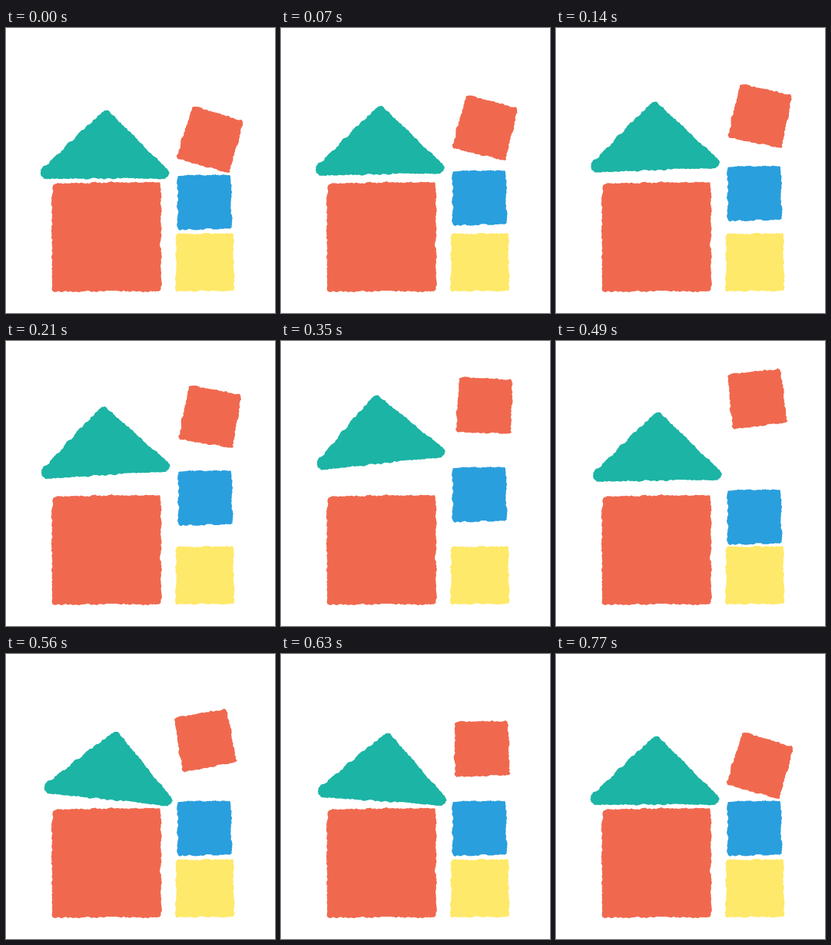
These frames come from a looping animation (350 by 370 pixels, 1.19 s). An HTML page with a canvas:

```html
<!DOCTYPE html>
<html lang="en">
<head>
<meta charset="utf-8">
<title>Bouncing blocks</title>
<style>
html, body { margin: 0; height: 100%; overflow: hidden; background: #fff; }
canvas { display: block; }
</style>
</head>
<body>
<canvas id="stage" width="350" height="370"></canvas>
<script>
const ctx = document.getElementById('stage').getContext('2d');
const STEP = 70, LOOP = 1190;

function seeded(seed) {
  return () => {
    seed = (seed * 1664525 + 1013904223) >>> 0;
    return seed / 4294967296;
  };
}

const toward = (a, b, d) => {
  const k = d / Math.hypot(b[0] - a[0], b[1] - a[1]);
  return [a[0] + (b[0] - a[0]) * k, a[1] + (b[1] - a[1]) * k];
};

// Polygon with rounded corners and a torn, crayon-like edge
function roughShape(corners, radius, seed) {
  const random = seeded(seed), points = [], n = corners.length;
  corners.forEach((p, i) => {
    const prev = corners[(i + n - 1) % n], next = corners[(i + 1) % n];
    const start = toward(p, prev, radius), end = toward(p, next, radius);
    for (let t = 0; t < 1; t += 0.25) {
      const u = 1 - t;
      points.push([0, 1].map(k => u * u * start[k] + 2 * u * t * p[k] + t * t * end[k]));
    }
    const length = Math.hypot(next[0] - p[0], next[1] - p[1]) - 2 * radius;
    for (let d = 0; d < length; d += 1.8) points.push(toward(end, next, d));
  });

  const path = new Path2D();
  let drift = 0;
  points.forEach((p, i) => {
    const a = points[(i + points.length - 1) % points.length];
    const b = points[(i + 1) % points.length];
    const size = Math.hypot(b[0] - a[0], b[1] - a[1]) || 1;
    drift = drift * 0.6 + (random() - 0.5) * 1.7;
    path.lineTo(p[0] + (b[1] - a[1]) / size * drift, p[1] - (b[0] - a[0]) / size * drift);
  });
  path.closePath();
  return path;
}

// Each key: step, x, y, degrees
const blocks = [
  {
    color: '#f0694f',
    path: roughShape([[60, 201.5], [201.5, 199.5], [202, 342], [60, 342]], 6, 11),
    keys: [[0, 0, 0, 0]]
  },
  {
    color: '#ffe96a',
    path: roughShape([[221, 267], [296.5, 266.5], [296.5, 341.5], [221, 341.5]], 3.5, 23),
    keys: [[0, 0, 0, 0]]
  },
  {
    color: '#2a9fde',
    path: roughShape([[-35, -35.5], [35, -35], [35.5, 35], [-35, 35.5]], 4.5, 37),
    keys: [[0, 258, 226, 0], [2, 258, 214.5, 0], [3, 259, 203.5, 0], [4, 258.5, 198, 0],
           [5, 258, 199, 0], [6, 258, 230.5, 0], [8, 258, 226, 0]]
  },
  {
    color: '#1cb4a5',
    path: roughShape([[2, -84], [84.5, -2], [81, 7.5], [-81, 7.5], [-85, -2]], 5, 53),
    keys: [[0, 128.5, 188, 0], [2, 129, 177, -2], [3, 129.5, 166.5, -3.4], [5, 130, 151.5, -6],
           [6, 130.5, 166, -7.5], [8, 133, 181.5, 6], [11, 128.5, 188, 0]]
  },
  {
    color: '#f0694f',
    path: roughShape([[-34.8, -35.5], [34.8, -35.5], [35.8, 35.5], [-35.8, 35.5]], 4, 71),
    keys: [[0, 266, 145, 16.5], [2, 266, 114.5, 12.2], [3, 266, 98.5, 10.3], [5, 265, 84, 2.5],
           [6, 263.5, 77, -2.8], [7, 261.5, 75, -6.4], [8, 259, 112, -10], [11, 266, 145, 16.5]]
  }
];

function pose(keys, step) {
  const i = keys.findIndex(key => key[0] > step);
  if (i < 0) return keys[keys.length - 1];
  const a = keys[i - 1], b = keys[i], t = (step - a[0]) / (b[0] - a[0]);
  return a.map((v, k) => v + (b[k] - v) * t);
}

function draw() {
  const step = Math.floor(performance.now() % LOOP / STEP);
  ctx.fillStyle = '#fff';
  ctx.fillRect(0, 0, 350, 370);
  for (const { color, path, keys } of blocks) {
    const [, x, y, angle] = pose(keys, step);
    ctx.save();
    ctx.translate(x, y);
    ctx.rotate(angle * Math.PI / 180);
    ctx.fillStyle = color;
    ctx.fill(path);
    ctx.restore();
  }
  requestAnimationFrame(draw);
}
draw();
</script>
</body>
</html>
```
